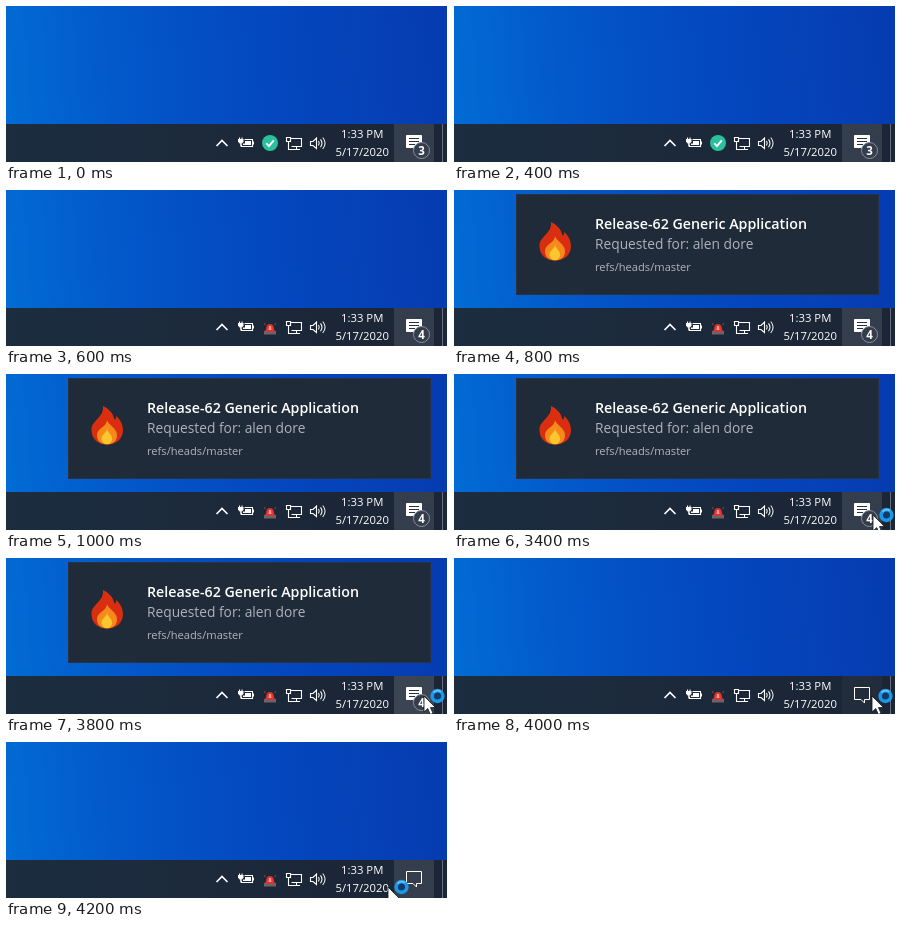
An HTML page for the animation above (4400 ms loop, 442x156 px).

```html
<!DOCTYPE html>
<html lang="en">
<head>
<meta charset="utf-8">
<title>Build notification</title>
<style>
  html, body { margin: 0; width: 100%; height: 100%; overflow: hidden; background: #0448bc; }
  svg { display: block; width: 442px; height: 156px; }
  text { font-family: "Open Sans", "Noto Sans", sans-serif; }
  .line { fill: none; stroke: #fff; stroke-width: 1.1; }
  .clock { font-size: 11.3px; font-weight: 500; fill: #fff; text-anchor: middle; }
</style>
</head>
<body>
<svg viewBox="0 0 442 156">
  <defs>
    <linearGradient id="sky" gradientUnits="userSpaceOnUse" x1="0" y1="70" x2="442" y2="30">
      <stop offset="0" stop-color="#026bd4"/>
      <stop offset=".25" stop-color="#0358ca"/>
      <stop offset=".55" stop-color="#0449c0"/>
      <stop offset="1" stop-color="#063bb1"/>
    </linearGradient>
    <linearGradient id="bar">
      <stop offset="0" stop-color="#1c2d40"/>
      <stop offset="1" stop-color="#1b2535"/>
    </linearGradient>
  </defs>

  <rect width="442" height="118" fill="url(#sky)"/>
  <rect y="118" width="442" height="38" fill="url(#bar)"/>
  <rect id="hover" x="388" y="118" width="40" height="38" fill="#fff" opacity=".11"/>
  <path d="M436.500 118V156" stroke="#66707d"/>
  <path d="M441.500 0V156" stroke="#fff"/>

  <!-- tray: chevron, battery, status, network, volume -->
  <path d="M210.500 140L216 134.500L221.500 140" fill="none" stroke="#fff" stroke-width="1.600"/>
  <g>
    <path class="line" d="M238.500 133.500H246.500V140.500H235.500V138.500"/>
    <path d="M239 135H245V139H237V137.500H239ZM247 135.500H248V138.500H247Z" fill="#fff"/>
    <path d="M232 133H237.500V135.500L236 137.500H233.500L232 135.500Z" fill="#fff"/>
    <path class="line" d="M233.500 131.500V133M236 131.500V133M234.800 137V140.500"/>
  </g>
  <g id="ok">
    <circle cx="264" cy="137" r="8" fill="#2cbf9b"/>
    <path d="M260.300 137.300L263 140L267.800 134.300" fill="none" stroke="#fff" stroke-width="1.900"/>
  </g>
  <g id="alarm">
    <path d="M259.500 141L261 135.500Q261.500 134 264 134T267 135.500L268.500 141Z" fill="#e5342b"/>
    <path d="M262.500 140L263 136H265L265.500 140Z" fill="#ff9a8c"/>
    <path d="M258 141H270V144.500H258Z" fill="#69616b"/>
    <path d="M259 140.500H269V142H259Z" fill="#c83a35"/>
    <path d="M258 133.500L259.500 134.800M270 133.500L268.500 134.800" stroke="#e5342b"/>
  </g>
  <g class="line">
    <path d="M285 132.500H295.500V140.500H285.500M290.500 140.500V143.500M287 143.500H294"/>
    <path d="M280.500 131.500H284.500V135.500H280.500ZM282.500 135.500V143.500H287"/>
  </g>
  <g class="line">
    <path d="M304.500 135.500H307L310.500 132V142.500L307 139.500H304.500Z"/>
    <path d="M312.500 135Q314 137 312.500 139.500M314.500 133.300Q317.500 137 314.500 141.200"/>
    <path d="M316.700 131.500Q321.500 137 316.700 143" stroke="#dce0e4"/>
  </g>
  <text class="clock" x="356.200" y="132">1:33 PM</text>
  <text class="clock" x="356.200" y="150">5/17/2020</text>

  <path id="bubble" d="M400.500 129.500H415.500V141.500H410.500V145L407 141.500H400.500Z" stroke="#fff"/>
  <g id="badge">
    <path d="M403 132.500H413M403 135.500H413M403 138.500H409" stroke="#263143"/>
    <circle cx="415.500" cy="144.500" r="8" fill="#333d4b" stroke="#88909a"/>
    <text id="count" x="415.500" y="148.500" font-size="11.500" font-weight="700" fill="#fff" text-anchor="middle"></text>
  </g>

  <g id="toast">
    <rect x="62.500" y="4.500" width="362" height="100" fill="#202b39" stroke="#253345"/>
    <path d="M97 32C104 35.500 107.500 40 108.500 46Q110.500 44.500 110.500 42C114.500 46 117 51 117 56C117 65 110 70.500 101 70.500C92 70.500 85.500 65 85.500 56C85.500 46 98 44 97 32Z" fill="#da2e10"/>
    <path d="M101 46C102 51 111 54 111 61C111 67 107 70.500 101 70.500C95 70.500 91 67 91 61C91 54 101 53 101 46Z" fill="#f58a1c"/>
    <path d="M101 55C101.500 58.500 106 60.500 106 64.500C106 68 104 70 101 70C98 70 95.500 68 95.500 64.500C95.500 60.500 100.500 58.500 101 55Z" fill="#fcc62e"/>
    <text x="141" y="39" font-size="14.250" font-weight="600" fill="#fff">Release-62 Generic Application</text>
    <text x="141" y="59" font-size="13.750" fill="#adb3ba">Requested for: alen dore</text>
    <text x="141" y="81" font-size="11.150" fill="#adb3ba">refs/heads/master</text>
  </g>

  <g id="cursor">
    <path d="M0 0V16L3.800 12.600L6.300 18.500L9 17.300L6.500 11.600H11.500Z" fill="#fff" stroke="#111" stroke-width=".8"/>
    <circle cx="13.500" r="5.400" fill="#123a68" stroke="#1b97ea" stroke-width="3.600"/>
    <path d="M9.500 -3.400A5.400 5.400 0 0 1 17 -4.100" fill="none" stroke="#63c3f7" stroke-width="1.800"/>
  </g>
</svg>
<script>
const LOOP = 4400, STEP = 200;
const ALERT = 600, TOAST = 800, POINTER = 3000, CLICK = 3800, DISMISS = 4000;
// Pointer tip at each step after it appears
const path = [[375, 148], [400, 146], [419, 141], [420, 140], [418, 138], [418, 138], [382, 145]];

const get = id => document.getElementById(id);
const show = (id, on) => get(id).setAttribute("display", on ? "inline" : "none");

function draw(t) {
  const alert = t >= ALERT, dismissed = t >= DISMISS;
  show("ok", !alert);
  show("alarm", alert);
  show("toast", t >= TOAST && !dismissed);
  show("badge", !dismissed);
  show("cursor", t >= POINTER);
  get("bubble").setAttribute("fill", dismissed ? "none" : "#fff");
  get("count").textContent = alert ? 4 : 3;

  const pressed = dismissed && t < DISMISS + STEP;
  const hovered = t >= CLICK && !dismissed;
  get("hover").setAttribute("opacity", pressed ? .03 : hovered ? .14 : .11);

  if (t >= POINTER) {
    const tip = path[Math.floor((t - POINTER) / STEP)];
    get("cursor").setAttribute("transform", `translate(${tip})`);
  }
}

const start = performance.now();
function tick() {
  draw((performance.now() - start) % LOOP);
  requestAnimationFrame(tick);
}
tick();
</script>
</body>
</html>
```
